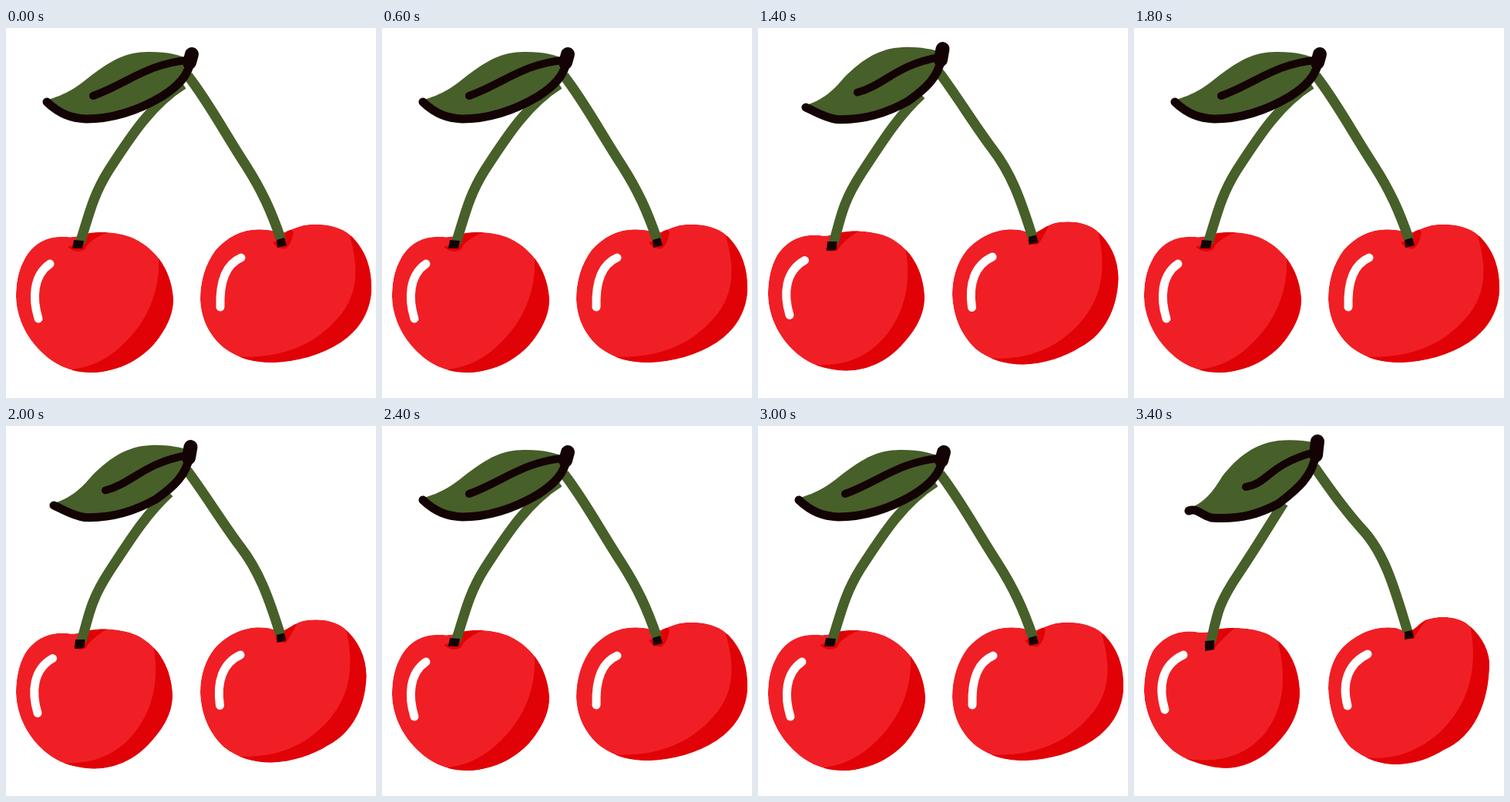
Recreate the animation shown at these times as an HTML page with a canvas. Size 480 px wide and 480 px high, loop 3.6 s.

```html
<!DOCTYPE html>
<html lang="en">
<head>
<meta charset="utf-8">
<title>Cherries</title>
<style>
  html, body { margin: 0; width: 100%; height: 100%; overflow: hidden; background: #fff; }
  canvas { display: block; width: 100vmin; height: 100vmin; }
</style>
</head>
<body>
<canvas id="stage" width="480" height="480"></canvas>
<script>
const ctx = document.getElementById("stage").getContext("2d");
const RED = "#f01f25", DARK = "#e00206", GREEN = "#475f29", BLACK = "#140304", WHITE = "#fff";
const POSE_MS = 200;

// Each part has a low pose and a raised pose with the same path commands.
const cherries = [
  {
    body: [
      "M80 271C52 269 35 280 24 300C16 314 13 331 13 349C14 382 32 412 60 432C76 443 94 447 112 447C146 446 180 429 199 401C210 385 217 370 217 352C215 317 197 288 166 273C148 265 124 263 104 267C97 269 90 272 80 271Z",
      "M80 267C55 264 37 275 25 291C17 305 13 325 13 344C14 372 26 398 46 417C60 431 80 437 97 441C126 448 148 441 170 426C189 410 215 384 215 345C214 315 203 286 174 270C153 261 130 261 112 263C104 265 92 270 80 267Z"],
    shade: [
      "M198 299C200 340 184 377 159 403C139 425 116 439 86 443L90 470L240 470L240 299Z",
      "M185 274C199 322 195 366 171 397C147 428 109 439 65 431L75 470L240 470L240 274Z"],
    dimple: [
      "M80 284Q92 294 103 287Q106 276 131 265L108 265Q102 272 101 277Z",
      "M94 288Q98 292 104 289Q113 277 132 261L112 261Q106 270 103 280Z"],
    shine: ["M57 306C35 321 34 351 42 377", "M64 297C36 310 31 338 40 368"],
    stem: ["M230 73C190 98 164 137 133 185C113 217 108 241 96 279", "M194 100C176 128 162 152 136 191C109 231 108 243 100 280"],
    tip: ["M88 275L101 276L99 286L86 286Z", "M92 279L104 278L104 290L92 292Z"]
  },
  {
    body: [
      "M340 262C312 258 290 268 272 288C258 307 252 329 252 352C253 378 264 400 284 416C302 429 322 434 346 434C378 433 409 424 434 408C457 393 472 370 474 342C475 314 468 289 447 269C431 255 407 253 386 256C374 259 367 263 361 265C353 266 347 263 340 262Z",
      "M340 262C311 258 287 271 270 288C258 301 252 320 252 340C253 370 263 397 281 417C299 432 319 439 342 439C366 438 386 430 402 420C440 404 461 360 461 306C459 285 447 268 430 255C415 246 394 246 380 251C368 257 366 264 357 266C350 266 346 264 340 262Z"],
    shade: [
      "M446 270C460 318 454 350 430 377C404 406 364 432 288 426L300 470L500 470L500 270Z",
      "M436 257C446 309 436 351 410 383C381 419 336 437 295 429L310 470L500 470L500 257Z"],
    dimple: [
      "M346 278Q352 288 363 286Q371 280 373 264L366 260Q361 268 360 274Z",
      "M352 272Q356 277 363 276Q367 267 381 250L370 250Q363 260 360 267Z"],
    shine: ["M305 298C284 307 277 331 278 362", "M303 296C278 308 269 333 277 363"],
    stem: ["M236 62C262 95 283 135 311 178C332 211 344 237 357 275", "M234 53C259 89 275 111 296 134C324 164 337 206 355 267"],
    tip: ["M351 275L361 272L364 282L352 285Z", "M351 267L361 265L363 275L351 277Z"]
  }
];
const leaf = {
  blade: [
    "M50 94C79 87 94 75 110 62C138 41 157 30 188 31C210 31 225 35 240 41C239 59 230 76 203 89C172 110 137 122 95 118C77 114 62 105 50 94Z",
    "M69 108C91 100 102 86 114 66C135 39 157 23 187 19C205 17 222 19 238 22C236 48 234 60 214 79C188 108 150 121 113 120C95 118 83 114 69 108Z"],
  edge: [
    "M53 96C70 112 85 117 104 118C140 118 173 106 202 89C224 75 236 62 240 42",
    "M71 110C82 106 86 115 100 119C139 122 164 113 187 101C212 82 232 65 236 36"],
  vein: ["M113 88C155 73 184 46 235 42", "M145 79C174 75 174 50 234 34"],
  knob: ["M241 34L238 45", "M238 20L236 38"]
};

// Blends the numbers of two paths that share their commands.
function blend([low, high], amount) {
  const ends = high.match(/\d+/g);
  let i = 0;
  return new Path2D(low.replace(/\d+/g, n => +n + (ends[i++] - n) * amount));
}

function draw(amount) {
  const fill = (part, color) => { ctx.fillStyle = color; ctx.fill(blend(part, amount)); };
  const line = (part, color, width, cap = "round") => {
    ctx.strokeStyle = color;
    ctx.lineWidth = width;
    ctx.lineCap = cap;
    ctx.stroke(blend(part, amount));
  };

  ctx.fillStyle = WHITE;
  ctx.fillRect(0, 0, 480, 480);
  for (const { body, shade, dimple, shine, stem, tip } of cherries) {
    ctx.save();
    ctx.clip(blend(body, amount));
    fill(body, RED);
    fill(shade, DARK);
    fill(dimple, DARK);
    ctx.restore();
    line(shine, WHITE, 11);
    line(stem, GREEN, 13, "butt");
    fill(tip, BLACK);
  }
  fill(leaf.blade, GREEN);
  line(leaf.edge, BLACK, 11);
  line(leaf.vein, BLACK, 10);
  line(leaf.knob, BLACK, 18);
}

const poses = [0, 0.5, 1];
function tick(now) {
  draw(poses[Math.floor(now / POSE_MS) % poses.length]);
  requestAnimationFrame(tick);
}
tick(performance.now());
</script>
</body>
</html>
```
